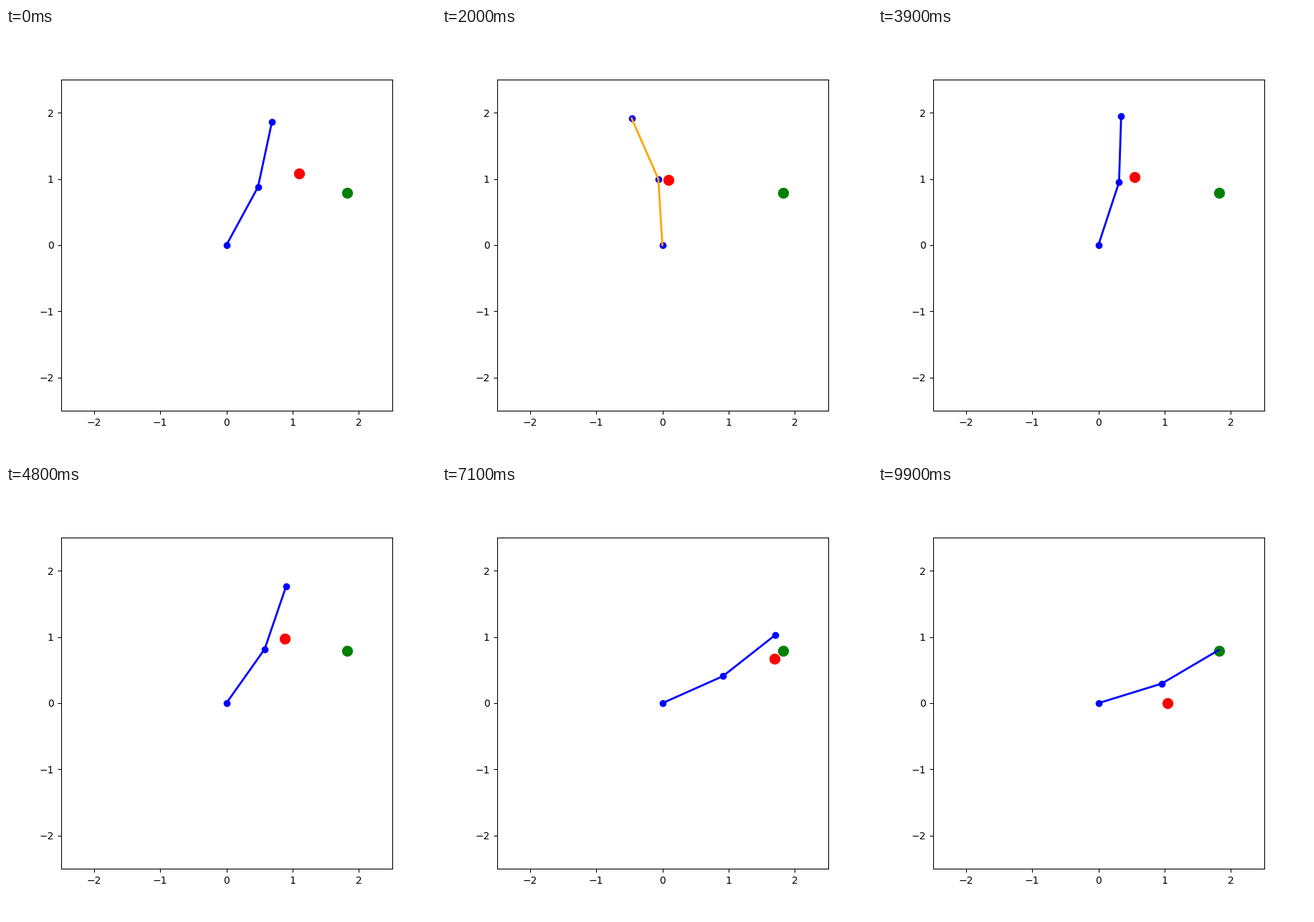
Recreate the animation shown at these times as a matplotlib script. Size 600 by 600 pixels, loop 10000 ms.

```python
import numpy as np
import matplotlib.pyplot as plt
from matplotlib.animation import FuncAnimation

FRAMES = 100
LEG = 20              # steps between obstacle waypoints
GOAL = (1.824, 0.79)
GOAL_AIM = 23.4       # direction from base to goal, degrees
START_AIM = 69.7
DANGER = 0.17         # gap below which the arm turns orange

WAYPOINTS = np.array([(1.100, 1.082), (0.093, 0.984), (0.567, 1.029),
                      (1.354, 0.892), (1.965, 0.498), (0.996, -0.026)])


def obstacle_at(t):
    leg, step = divmod(t, LEG)
    a, b = WAYPOINTS[leg:leg + 2]
    return a + (b - a) * step / LEG


def elbow_bend(aim, push):
    return 13.3 + 3.2 * np.sin(np.pi * (aim - GOAL_AIM) / 85) + 5.2 * push


def blocked_aim(t, bend, gap):
    """Aim that keeps the outer link at the given gap from the obstacle."""
    x, y = obstacle_at(t)
    reach = (gap + np.sin(np.radians(bend))) / np.hypot(x, y)
    turn = np.arctan2(y, x) + np.arcsin(np.clip(reach, -1, 1))
    return np.degrees(turn) - bend / 2


def simulate():
    """Ease the aim to the goal, giving way to the obstacle on its path."""
    aim, push = START_AIM, 0.0
    poses = [(aim, elbow_bend(aim, push), False)]
    for t in range(1, FRAMES):
        push += 0.3 * ((t <= LEG) - push)   # obstacle closes in on the first leg
        aim += 0.1 * (GOAL_AIM - aim)
        bend = elbow_bend(aim, push)
        gap = 0.255 - 0.0005 * (aim - GOAL_AIM) - 0.085 * push
        if t < 4 * LEG:                     # afterwards the obstacle has passed
            aim = max(aim, blocked_aim(t, bend, gap))
        poses.append((aim, bend, gap < DANGER))
    return poses


def arm_points(aim, bend):
    links = np.radians([aim - bend / 2, aim + bend / 2])
    return [np.concatenate([[0], np.cumsum(f(links))]) for f in (np.cos, np.sin)]


fig, ax = plt.subplots(figsize=(6, 6), dpi=100)
ax.set_xlim(-2.5, 2.5)
ax.set_ylim(-2.5, 2.5)
ax.set_aspect("equal")

joints, = ax.plot([], [], "o", color="blue")
obstacle, = ax.plot([], [], "o", color="red", markersize=10)
ax.plot(*GOAL, "o", color="green", markersize=10)
arm, = ax.plot([], [], lw=2)

POSES = simulate()


def update(t):
    aim, bend, danger = POSES[t]
    points = arm_points(aim, bend)
    joints.set_data(*points)
    arm.set_data(*points)
    arm.set_color("orange" if danger else "blue")
    x, y = obstacle_at(t)
    obstacle.set_data([x], [y])
    return joints, obstacle, arm


anim = FuncAnimation(fig, update, frames=FRAMES, interval=100,
                     repeat=True, repeat_delay=0)
plt.show()
```
